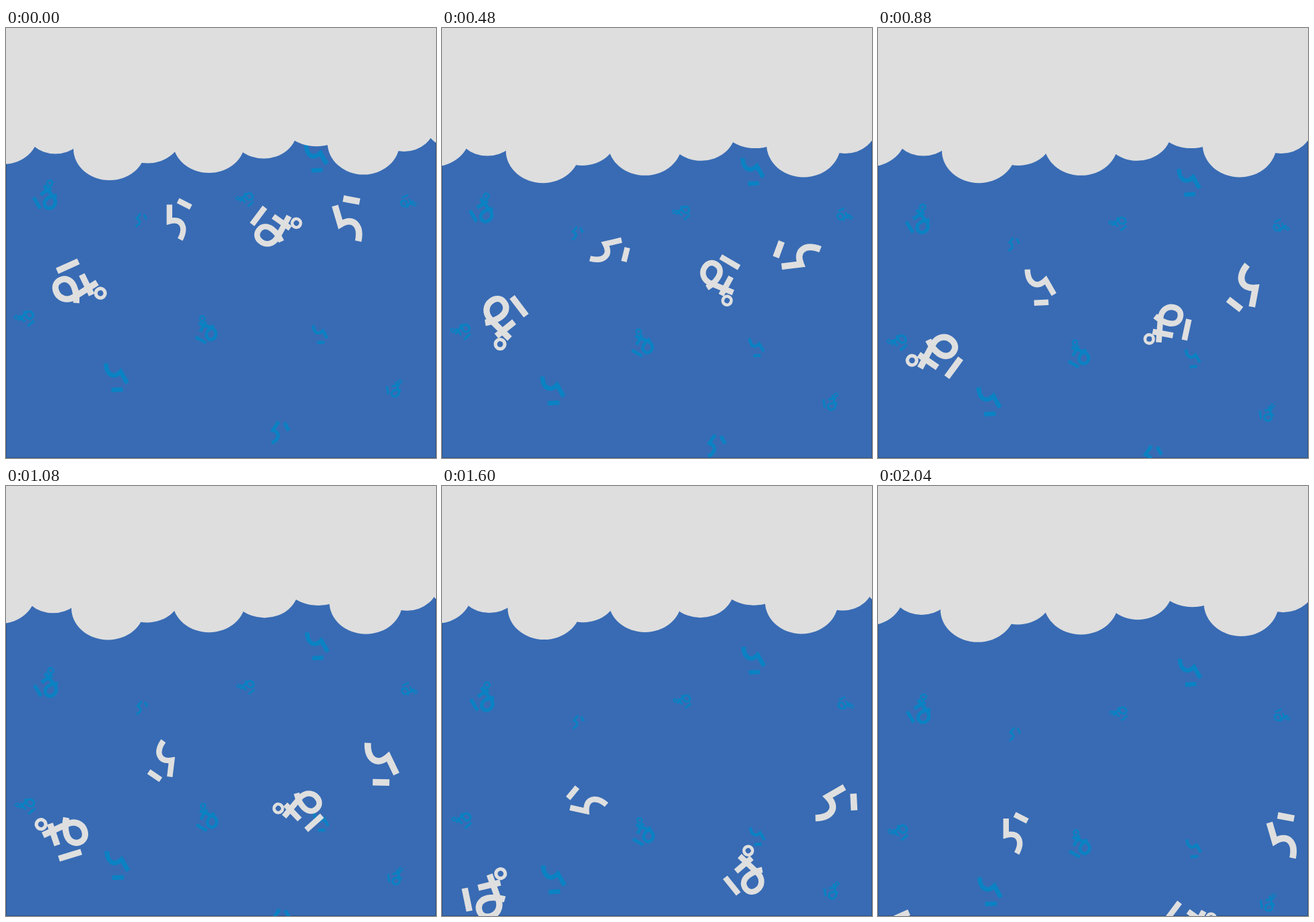
An HTML page for the animation above (2.16 s loop, 644x644 px).

```html
<!DOCTYPE html>
<html lang="ja">
<head>
<meta charset="utf-8">
<title>ぱらぱら</title>
<style>
  html, body { margin: 0; width: 100%; height: 100%; overflow: hidden; background: #386bb4; }
  svg { display: block; width: 100vw; height: 100vh; }
  .ink { fill: none; stroke: currentColor; }
  #drizzle { color: #0a82c3; }
  #rain { color: #dfdfdf; }
  #cloud { fill: #dedede; }
</style>
</head>
<body>
<svg viewBox="0 0 644 644">
  <defs>
    <g id="pa" class="ink" stroke-width="9.4">
      <path d="M-30-17.5V17.5"/>
      <path d="M-10-14L24-15"/>
      <path d="M10.5-30L16 9C18 24 8 31.5-1 31.5C-10 31.5-15.5 26-15.5 18.5C-15.5 9-8 4 1 4C10 4 18 7 25.5 11"/>
      <circle cx="27" cy="-28" r="7" stroke-width="5.2"/>
    </g>
    <g id="ra" class="ink" stroke-width="8.4">
      <path d="M-2.6-29.4L16.6-19.6"/>
      <path d="M-15.5-23.5V1.5C3-3.5 10.5 10 .5 28.8"/>
    </g>
  </defs>
  <rect width="644" height="644" fill="#386bb4"/>
  <path d="M.5 0V643.5H643.5V0" fill="none" stroke="#2c5388"/>
  <g id="drizzle"></g>
  <g id="cloud"><rect x="-100" y="-100" width="850" height="256"/></g>
  <g id="rain"></g>
</svg>
<script>
const LOOP = 2160, STEP = 40, LAST = 2040, BEAT = 680, LANDED = 2022;
const NS = "http://www.w3.org/2000/svg";
const $ = id => document.getElementById(id);

function add(parent, tag, attrs) {
  const el = document.createElementNS(NS, tag);
  for (const k in attrs) el.setAttribute(k, attrs[k]);
  return parent.appendChild(el);
}

// Cloud puffs: centre x, lowest y, radii
[
  [-4, 204, 52.6, 47], [74, 188.5, 46, 40], [155, 228, 54, 47],
  [212.5, 202.5, 51, 44], [304, 217, 54, 47], [386, 195.5, 50, 43],
  [465, 177.3, 58, 50], [535.5, 219.5, 54, 47.5], [596, 185, 46, 40],
  [675, 181, 50, 43]
].forEach(([cx, low, rx, ry]) => add($("cloud"), "ellipse", { cx, cy: low - ry, rx, ry }));

// Small drops: glyph, x, y, angle, scale
[
  ["pa", 60.7, 253.3, -31, .56], ["ra", 200.7, 288.5, 38, .38],
  ["pa", 360, 256, 230, .33], ["ra", 461, 194, 150, .77],
  ["ra", 161.5, 522, 150, .8], ["pa", 601, 260.5, 65, .3],
  ["pa", 30, 434, 230, .37], ["pa", 299.5, 454, -60, .51],
  ["ra", 468, 458, 150, .52], ["pa", 582, 541, -9, .35],
  ["ra", 408, 607, 35, .62]
].forEach(([glyph, x, y, angle, scale]) => add($("drizzle"), "use", {
  href: "#" + glyph,
  transform: `translate(${x} ${y}) rotate(${angle}) scale(${scale})`
}));

// Big drops: pivot, travel, spin direction, first angle, glyph offset, delay in ms
const drops = [
  { glyph: "pa", x: 111.8, y: 378.6, dx: -62, dy: 289, spin: 1, angle: 65.8, scale: 1, off: "2.1 8.6", delay: 60 },
  { glyph: "ra", x: 260.3, y: 288.5, dx: -53, dy: 233.5, spin: 1, angle: 0, scale: 1, off: "0 -.6", delay: 62 },
  { glyph: "pa", x: 404.5, y: 296.3, dx: 64, dy: 355, spin: 1, angle: 37, scale: .91, off: "-3 4.3", delay: 15 },
  { glyph: "ra", x: 512.5, y: 288, dx: 93.5, dy: 238, spin: -1, angle: -16.3, scale: 1.16, off: "4.4 .65", delay: 35 }
];
for (const d of drops) d.el = add($("rain"), "use", { href: "#" + d.glyph });

function draw(t) {
  const swell = 1 - Math.abs(t % (2 * BEAT) / BEAT - 1);
  $("cloud").setAttribute("transform", `translate(304 70) scale(${1 + .037 * swell}) translate(-304 -70)`);
  $("drizzle").setAttribute("transform", `translate(${2.5 * t / LAST} ${84 * t / LAST})`);
  for (const d of drops) {
    const p = Math.min(1, Math.max(0, (t - d.delay) / (LANDED - d.delay)));
    d.el.setAttribute("transform",
      `translate(${d.x + d.dx * p} ${d.y + d.dy * p}) rotate(${d.angle + d.spin * 360 * p}) ` +
      `scale(${d.scale}) translate(${d.off})`);
  }
}

const start = performance.now();
function tick() {
  const t = (performance.now() - start) % LOOP;
  draw(Math.min(Math.floor(t / STEP) * STEP, LAST));
  requestAnimationFrame(tick);
}
tick();
</script>
</body>
</html>
```
